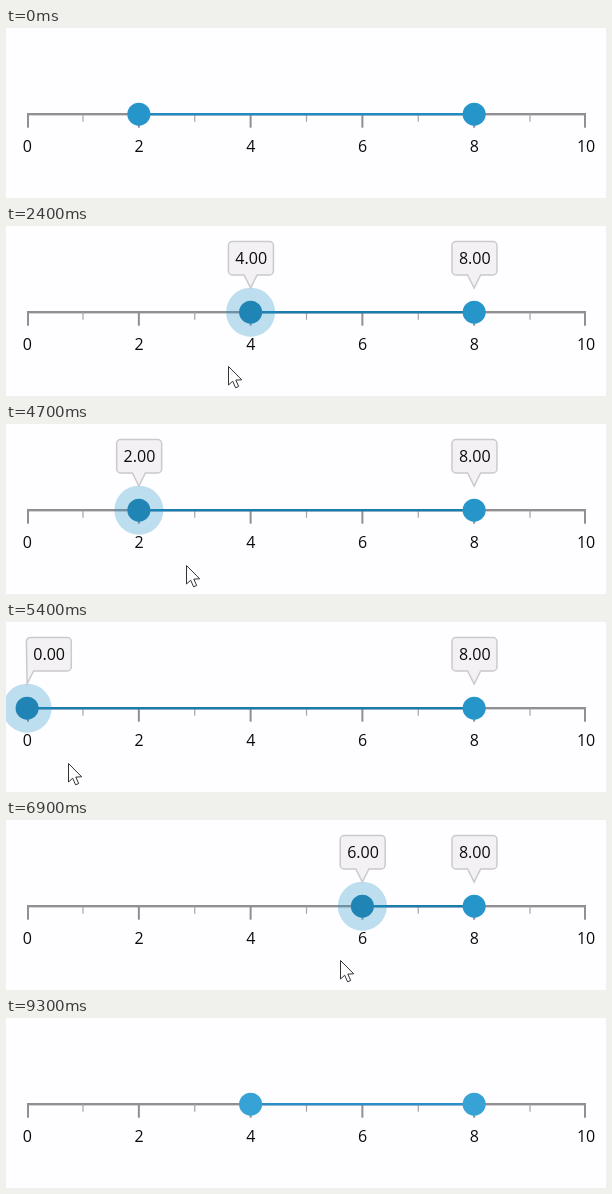
An HTML page with a canvas for the animation above (9400 ms loop, 600 by 170 pixels).

```html
<!DOCTYPE html>
<html lang="en">
<head>
<meta charset="utf-8">
<title>Range slider</title>
<style>
  html, body { margin: 0; width: 600px; height: 170px; overflow: hidden; background: #fefdff; }
  canvas { display: block; }
</style>
</head>
<body>
<canvas id="stage" width="600" height="170"></canvas>
<script>
const ctx = document.getElementById('stage').getContext('2d');
const LOOP = 9400, STEP = 100;
const ENTER = 600, PRESS = 1300, DRAG = 2000, RELEASE = 9000, LEAVE = 9200;
const TRACK_Y = 86.2, LINE = 2.4, THUMB = 11.5, HALO = 24.5;
const UNIT = 55.88, END = 8;

// Pointer strokes: each eases from wherever the last one stopped
const strokes = [
  { from: 500, to: 700, x: 134, y: 87 },
  { from: DRAG, to: 2400, x: 222, y: 140 },
  { from: 2400, to: 2500, x: 232, y: 140 },
  { from: 2700, to: 3200, x: 361, y: 141 },
  { from: 3800, to: 4300, x: 262, y: 141 },
  { from: 4400, to: 4900, x: 136, y: 141 },
  { from: 5100, to: 5600, x: 22, y: 141 },
  { from: 6000, to: 7000, x: 343, y: 140 },
  { from: 7000, to: 7800, x: 428, y: 134 },
  { from: 7900, to: 8000, x: 368, y: 132 },
  { from: 8000, to: 8900, x: 248, y: 139 },
  { from: 8900, to: LEAVE, x: 258, y: 160 }
];

const clamp = (v, lo, hi) => Math.max(lo, Math.min(hi, v));
const mix = (a, b, u) => a + (b - a) * u;
const smooth = u => u * u * (3 - 2 * u);
const toX = v => 21.1 + v * UNIT;

function pointerAt(t) {
  let x = 180, y = 200;
  for (const s of strokes) {
    const u = smooth(clamp((t - s.from) / (s.to - s.from), 0, 1));
    x = mix(x, s.x, u);
    y = mix(y, s.y, u);
  }
  return { x: Math.round(x), y: Math.round(y) };
}

// The dragged thumb snaps to even values
function valueAt(t) {
  const v = (pointerAt(t).x - toX(0)) / UNIT;
  return clamp(Math.round(v / 2) * 2, 0, END);
}

function pressAt(t) {
  const u = t < RELEASE ? (t - PRESS + STEP) / 300 : 1 - (t - RELEASE + STEP) / 300;
  const p = clamp(u, 0, 1);
  return p * (2 - p);
}

function rect(x, y, w, h, color) {
  ctx.fillStyle = color;
  ctx.fillRect(x, y, w, h);
}

function disc(x, r, color) {
  ctx.fillStyle = color;
  ctx.beginPath();
  ctx.arc(x, TRACK_Y, r, 0, Math.PI * 2);
  ctx.fill();
}

function text(s, x, y) {
  ctx.fillStyle = '#0c0c0c';
  ctx.fillText(s, x, y);
}

function outline(fill, stroke, width) {
  ctx.closePath();
  ctx.fillStyle = fill;
  ctx.fill();
  ctx.strokeStyle = stroke;
  ctx.lineWidth = width;
  ctx.stroke();
}

function line(x0, x1, color) {
  rect(x0, TRACK_Y - LINE / 2, x1 - x0, LINE, color);
}

function drawScale() {
  const gray = '#918f94';
  line(21, 580, gray);
  for (let v = 0; v <= 10; v++) {
    const x = clamp(toX(v), 22, 579);
    if (v % 2) {
      rect(x - 0.6, TRACK_Y, 1.2, 7.5, '#a5a3a8');
    } else {
      rect(x - 1, TRACK_Y, 2, 13.5, gray);
      text(v, toX(v) + 0.2, 124);
    }
  }
}

function drawTip(value, scale) {
  const x = toX(value), y = 62;
  const left = Math.max(x - 22.2, 20.3), right = left + 45;
  const top = 15.5, bottom = 49, r = 4, half = 6.5;
  ctx.save();
  ctx.translate(x, y);
  ctx.scale(scale, scale);
  ctx.translate(-x, -y);
  ctx.beginPath();
  ctx.moveTo(left + r, top);
  ctx.arcTo(right, top, right, bottom, r);
  ctx.arcTo(right, bottom, left, bottom, r);
  ctx.lineTo(x + half, bottom);
  ctx.lineTo(x, y);
  if (x - half > left + r) {
    ctx.lineTo(x - half, bottom);
    ctx.arcTo(left, bottom, left, top, r);
  }
  ctx.arcTo(left, top, right, top, r);
  outline('#f3f1f3', '#cbc9cc', 1.5);
  text(value.toFixed(2), left + 22.8, 38.3);
  ctx.restore();
}

function drawPointer({ x, y }) {
  ctx.save();
  ctx.translate(x + 0.5, y + 0.5);
  ctx.beginPath();
  [[0, 0], [0, 18.5], [4.2, 14.7], [7.1, 21.3], [10.2, 20], [7.3, 13.6], [13.2, 13.3]]
    .forEach(p => ctx.lineTo(...p));
  outline('#fff', '#333', 1);
  ctx.restore();
}

function draw(t) {
  const value = valueAt(t), x = toX(value), endX = toX(END);
  const press = pressAt(t);
  const dragging = t >= PRESS && t < RELEASE;
  const hover = t >= ENTER && !dragging;
  const idle = hover ? '#37a2d5' : '#2696ca';

  rect(0, 0, 600, 170, '#fefdff');
  ctx.font = '16px "Open Sans", "Noto Sans", sans-serif';
  ctx.textAlign = 'center';

  drawScale();
  line(x, endX, dragging ? '#197cac' : hover ? '#2c8fca' : '#228bc1');
  disc(endX, THUMB, idle);
  if (press > 0) disc(x, mix(THUMB, HALO, press), 'rgba(33,150,200,0.3)');
  disc(x, THUMB, dragging ? '#2084b5' : idle);
  if (press > 0) {
    drawTip(END, press);
    drawTip(value, press);
  }
  if (t >= ENTER && t <= LEAVE) drawPointer(pointerAt(t));
}

const start = performance.now();
function tick() {
  const t = (performance.now() - start) % LOOP;
  draw(t < DRAG ? Math.min(Math.floor(t / STEP) * STEP, DRAG) : Math.floor(t / STEP) * STEP);
  requestAnimationFrame(tick);
}
tick();
</script>
</body>
</html>
```
